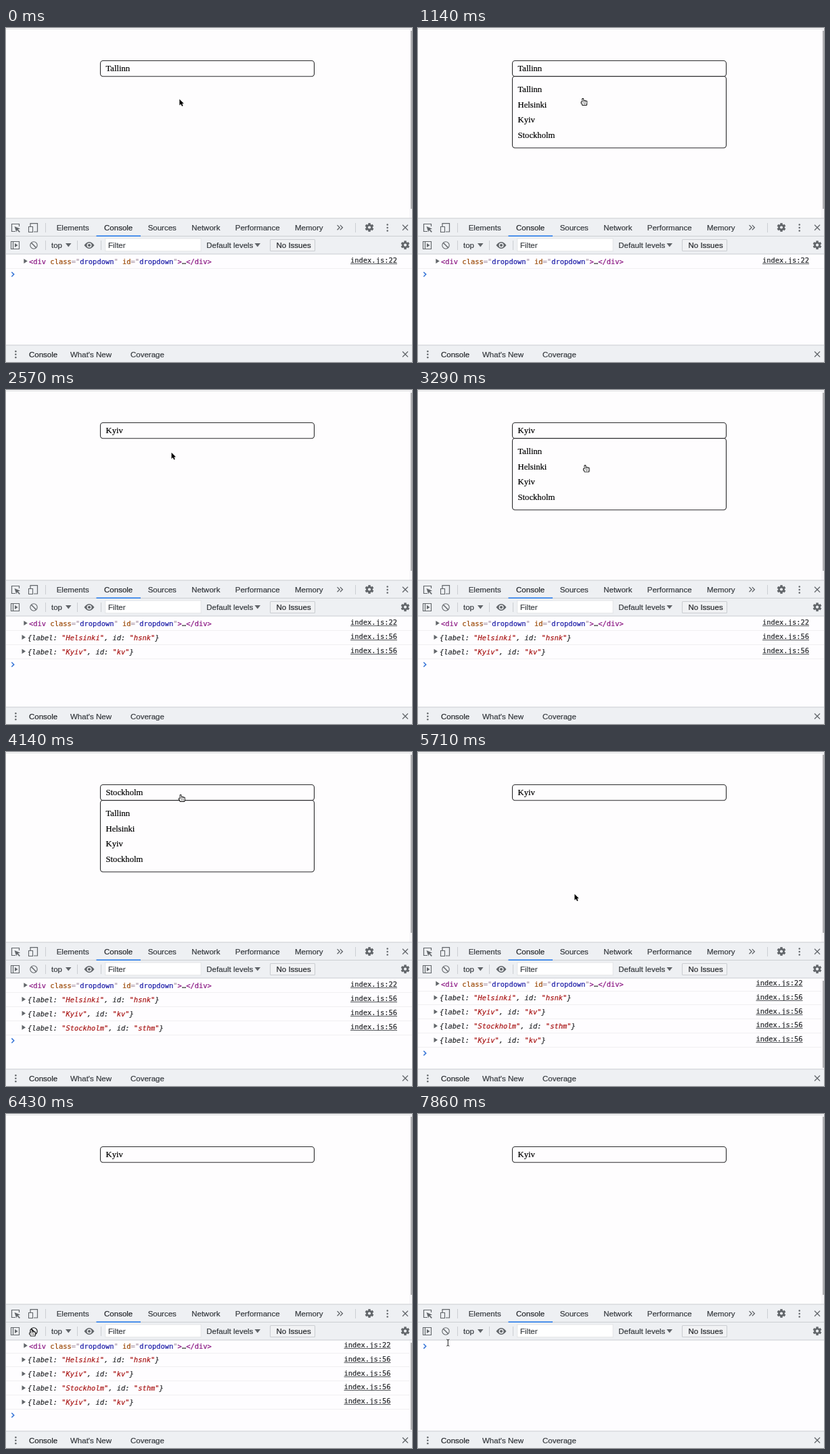
Animation, 600 px wide and 495 px high, one loop 8000 ms. Source, as an HTML page with a canvas:

```html
<!DOCTYPE html>
<html lang="en">
<head>
<meta charset="utf-8">
<title>Dropdown and console</title>
<style>
html, body { margin: 0; width: 100%; height: 100%; overflow: hidden; background: #fefdfe; }
canvas { display: block; }
</style>
</head>
<body>
<canvas id="stage" width="600" height="495"></canvas>
<script>
const ctx = document.getElementById('stage').getContext('2d');
const LOOP = 8000, FPS = 7, CLEAR = 6708;
const UI = '11.5px "Liberation Sans", Arial, sans-serif';
const SERIF = '12.67px "Liberation Serif", Times, serif';
const MONO = '10.43px "DejaVu Sans Mono", Menlo, monospace';
const ICON = '#62666a', BAR = '#eef0f3', EDGE = '#cbced2', INK = '#202327', SOFT = '#34383d';
const CITIES = ['Tallinn', 'Helsinki', 'Kyiv', 'Stockholm'];
const IDS = { Helsinki: 'hsnk', Kyiv: 'kv', Stockholm: 'sthm' };
const ROW = 20.9, ITEM = 22.4;

// Each visit opens the list at the box and picks one city from it
const VISITS = [
  { city: 1, open: 565, pick: 1425, x: 250 },
  { city: 2, open: 1855, pick: 2424, x: 241.5 },
  { city: 3, open: 2995, pick: 3566, x: 251 },
  { city: 2, open: 3995, pick: 4852, x: 258.5 }
];
const path = [{ t: 0, x: 256, y: 105 }];
for (const { city, open, pick, x } of VISITS) {
  path.push({ t: open - 195, x, y: 63 }, { t: open + 145, x, y: 63 },
    { t: pick - 140, x: x - 7, y: 89 + city * ITEM });
}
path.push({ t: 5714, x: 231, y: 210 }, { t: 6286, x: 37.7, y: 318.7 },
  { t: CLEAR, x: 37.7, y: 318.7 }, { t: 7714, x: 44.3, y: 339 }, { t: LOOP, x: 44.3, y: 339 });

function pointer(t) {
  const i = Math.max(1, path.findIndex(p => p.t >= t));
  const a = path[i - 1], b = path[i];
  const u = (t - a.t) / (b.t - a.t), k = u * u * (3 - 2 * u);
  return { x: a.x + (b.x - a.x) * k, y: a.y + (b.y - a.y) * k };
}

function text(s, x, y, color = SOFT, font = UI) {
  ctx.font = font;
  ctx.fillStyle = ctx.strokeStyle = color;
  ctx.lineWidth = 0.2;
  ctx.fillText(s, x, y);
  ctx.strokeText(s, x, y);
  return ctx.measureText(s).width;
}
function rect(x, y, w, h, color) {
  ctx.fillStyle = color;
  ctx.fillRect(x, y, w, h);
}
function box(x, y, w, h, color = ICON, r = 0, fill) {
  ctx.beginPath();
  ctx.roundRect(x, y, w, h, r);
  if (fill) { ctx.fillStyle = fill; ctx.fill(); }
  ctx.strokeStyle = color;
  ctx.lineWidth = 1.1;
  ctx.stroke();
}
function trace(points, close) {
  ctx.beginPath();
  for (let i = 0; i < points.length; i += 2) ctx.lineTo(points[i], points[i + 1]);
  if (close) ctx.closePath();
}
function line(points, color = ICON, width = 1.3, close = false) {
  trace(points, close);
  ctx.strokeStyle = color;
  ctx.lineWidth = width;
  ctx.stroke();
}
function poly(points, color = ICON) {
  trace(points, true);
  ctx.fillStyle = color;
  ctx.fill();
}
function disc(x, y, r, color = ICON) {
  ctx.beginPath();
  ctx.arc(x, y, r, 0, 7);
  ctx.fillStyle = color;
  ctx.fill();
}

const kebab = (x, y) => [-4.5, 0, 4.5].forEach(d => disc(x, y + d, 1.25));
const divider = (x, y) => rect(x, y, 1, 14, EDGE);
const caretDown = (x, y) => poly([x, y, x + 8.5, y, x + 4.25, y + 5.5]);
const playMark = (x, y, w, h) => poly([x, y - h, x + w, y, x, y + h]);
const chevron = (x, y, r, color, width) =>
  line([x, y - r, x + r, y, x, y + r], color, width);
const scrollbar = (y, h, from, len) => {
  rect(596, y, 4, h, '#f7f6f8');
  rect(598, from, 2, len, '#b0b0b3');
};
function cross(x, y) {
  for (const d of [-4, 4]) line([x - 4, y - d, x + 4, y + d]);
}
function gear(x, y) {
  for (let a = Math.PI / 6; a < 6.5; a += Math.PI / 3)
    line([x, y, x + 6.4 * Math.cos(a), y + 6.4 * Math.sin(a)], ICON, 3.4);
  disc(x, y, 4.8);
  disc(x, y, 2.1, BAR);
}

function page(open, label) {
  rect(0, 0, 600, 282, '#fefdfe');
  rect(0, 1, 600, 1, '#dcdde0');
  scrollbar(2, 280, 4, 264);
  box(139.5, 48.5, 316, 23.3, '#2b2b2d', 4);
  text(label, 147.5, 64, '#000', SERIF);
  if (!open) return;
  box(139.5, 71.5, 316, 106.3, '#2b2b2d', 4);
  CITIES.forEach((c, i) => text(c, 147.5, 95.4 + i * ITEM, '#000', SERIF));
}

function tabs() {
  rect(0, 282, 600, 27, BAR);
  rect(0, 281.5, 600, 1, EDGE);
  rect(0, 308, 600, 1, EDGE);
  rect(133.5, 307.5, 65.5, 2, '#1a73e8');
  line([14, 301.5, 8.5, 301.5, 8.5, 290.5, 19.5, 290.5, 19.5, 294], ICON, 1.2);
  poly([12.5, 294, 21, 297.5, 16.5, 299, 15.3, 302.5]);
  line([16, 298, 20.3, 302.3], ICON, 1.7);
  line([36, 294, 36, 289.7, 46.5, 289.7, 46.5, 302, 41, 302], ICON, 1.2);
  box(33.5, 294.5, 6, 8);
  divider(58, 289);
  let x = 74.7;
  for (const name of ['Elements', 'Console', 'Sources', 'Network', 'Performance', 'Memory'])
    x += text(name, x, 299.7, name === 'Console' ? INK : SOFT) + 22.4;
  chevron(489.5, 295.7, 3.6);
  chevron(493.8, 295.7, 3.6);
  divider(516, 289);
  gear(537, 295.5);
  kebab(563.7, 296);
  cross(590, 295.7);
}

function toolbar(hover) {
  rect(0, 309, 600, 26, BAR);
  rect(0, 334.5, 600, 1, EDGE);
  box(7.5, 316.5, 12, 11);
  line([10.5, 316.5, 10.5, 327.5], ICON, 1.2);
  playMark(13, 322, 4.5, 3);
  const ink = hover ? '#111' : ICON;
  box(35.8, 316.8, 10.4, 10.4, ink, 5.2);
  line([37.3, 318.3, 44.7, 325.7], ink, 1.5);
  [58, 105, 140].forEach(x => divider(x, 315));
  text('top', 67, 325.5);
  caretDown(88, 319);
  ctx.beginPath();
  ctx.moveTo(115.5, 322);
  ctx.quadraticCurveTo(123, 312, 130.5, 322);
  ctx.quadraticCurveTo(123, 332, 115.5, 322);
  ctx.fillStyle = ICON;
  ctx.fill();
  disc(123, 322, 3.5, BAR);
  disc(123, 322, 2.1);
  box(146.7, 312, 141.5, 18.8, '#e3e5e8', 0, '#fff');
  text('Filter', 151, 325.7, '#3f4347');
  text('Default levels', 296.3, 325.5);
  caretDown(367.5, 319);
  box(390.5, 313.5, 66, 17, EDGE, 1, '#f1f2f4');
  text('No Issues', 399.5, 325.7, INK);
  gear(590, 321.7);
}

function tokens(parts, x, y, font) {
  for (const [s, color] of parts) x += text(s, x, y, color, font);
}
function element(y) {
  const tag = '#881280', dim = '#a894a6', attr = '#994500', val = '#1a1aa6';
  const pair = name => [[name, attr], ['="', dim], ['dropdown', val], ['"', dim]];
  tokens([['<div ', tag], ...pair('class'), [' ', dim], ...pair('id'), ['>', tag],
    ['…', '#333'], ['</div>', tag]], 34, y, MONO);
}
function record(city, y) {
  const key = '#26282b', str = '#a81414';
  tokens([['{label: ', key], [`"${city}"`, str], [', id: ', key],
    [`"${IDS[city]}"`, str], ['}', key]], 32, y, 'italic ' + MONO);
}
function link(s, x, y) {
  const w = text(s, x, y, '#26282b', MONO);
  rect(x, y + 1, w, 1, '#55585c');
}

function log(picked, cleared, caret) {
  rect(0, 335, 600, 135, '#fefdff');
  ctx.save();
  ctx.beginPath();
  ctx.rect(0, 335.5, 600, 134);
  ctx.clip();
  const rows = cleared ? 0 : picked.length + 1;
  const end = 344.2 + rows * ROW;
  const scroll = Math.max(0, end - 446.4);
  for (let i = 0; i < rows; i++) {
    const y = 345.5 + i * ROW - scroll;
    rect(0, Math.round(y + 10.3), 600, 1, '#f0eff1');
    playMark(i ? 23.5 : 26.3, y, 5.5, 3.6);
    if (i) record(picked[i - 1], y + 4.3); else element(y + 4.3);
    link(i ? 'index.js:56' : 'index.js:22', scroll ? 499.5 : 509, Math.round(y + 2.5));
  }
  chevron(8.3, end - scroll, 3.4, '#3b78d8', 1.6);
  if (caret) rect(21.5, 337.5, 1, 12, '#222');
  if (scroll) scrollbar(335.5, 134, 339, 129);
  ctx.restore();
}

function drawer() {
  rect(0, 470, 600, 25, BAR);
  rect(0, 469.5, 600, 1, EDGE);
  kebab(14.3, 483.8);
  text('Console', 34, 487.5, INK);
  text("What's New", 95, 487.5);
  text('Coverage', 184, 487.5);
  cross(590, 483.5);
}

const cursors = {
  arrow() {
    const shape = [0.4, 0.4, 0.4, 9.6, 2.5, 7.7, 4, 11, 5.6, 10.3, 4.2, 7.1, 6.8, 7];
    line(shape, '#fff', 1.6, true);
    poly(shape, '#000');
  },
  hand() {
    // Outline pass, then a smaller white pass that merges the parts
    for (const [grow, color] of [[0.5, '#111'], [-0.35, '#fff']]) {
      const pad = (x, y, w, h) => {
        ctx.beginPath();
        ctx.roundRect(x - grow, y - grow, w + 2 * grow, h + 2 * grow, 0.8);
        ctx.fillStyle = color;
        ctx.fill();
      };
      pad(-1.4, 0.6, 1.9, 8);
      for (let i = 0; i < 3; i++) pad(0.4 + i * 1.7, 3.2 + i * 0.5, 1.9, 5);
      pad(-3, 5.5, 2.2, 2.6);
      pad(-1.6, 6.2, 7, 4.2);
    }
    for (let i = 0; i < 3; i++) rect(0.6 + i * 1.6, 7, 0.6, 2.4, '#444');
  },
  beam() {
    line([0, -4, 0, 4], '#222', 1);
    for (const d of [-1, 1]) line([-2, 5 * d, 0, 4 * d, 2, 5 * d], '#222', 1);
  }
};

function draw(t) {
  const picked = VISITS.filter(v => t >= v.pick).map(v => CITIES[v.city]);
  const open = VISITS.some(v => t >= v.open && t < v.pick);
  const { x, y } = pointer(t);
  const onButton = x < 52 && y > 311 && y < 333;
  const onList = y > 48 && y < (open ? 178 : 72);
  page(open, picked.at(-1) || CITIES[0]);
  log(picked, t >= CLEAR, t > 7280 && t < 7800);
  tabs();
  toolbar(onButton);
  drawer();
  ctx.save();
  ctx.translate(x, y);
  cursors[onButton || onList ? 'hand' : y > 333 ? 'beam' : 'arrow']();
  ctx.restore();
}

const start = performance.now();
function tick() {
  const t = (performance.now() - start) % LOOP;
  const step = Math.floor((t + 6) * FPS / 1000) % (LOOP * FPS / 1000);
  draw(step * 1000 / FPS);
  requestAnimationFrame(tick);
}
tick();
</script>
</body>
</html>
```
